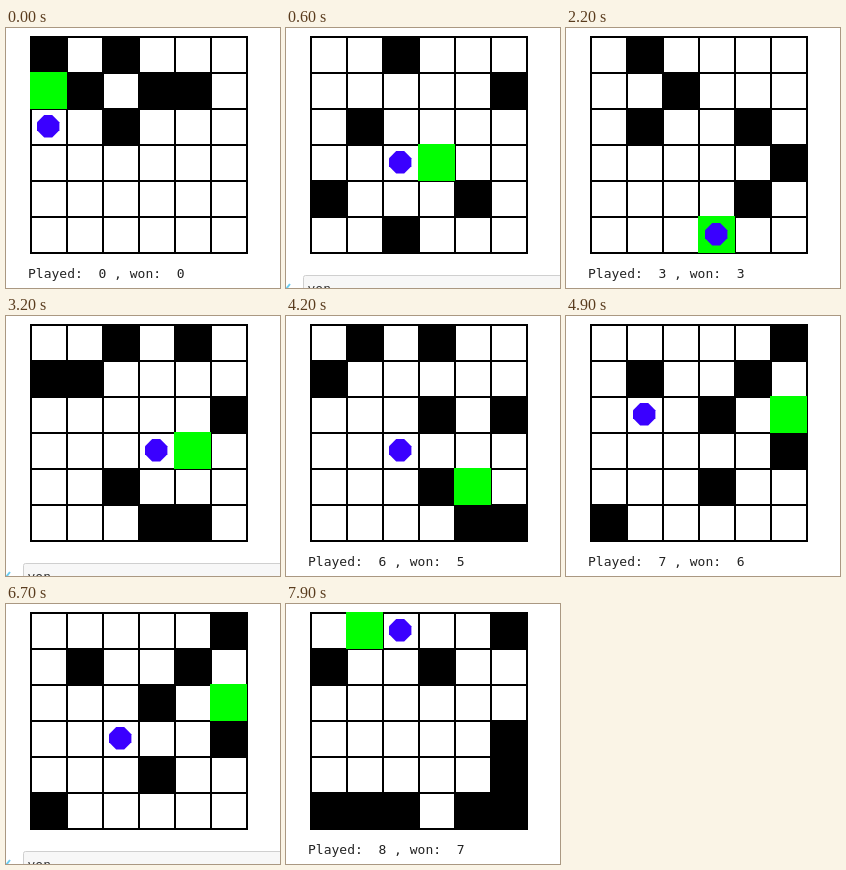
Recreate the animation shown at these times as an HTML page. Size 274 px wide and 260 px high, loop 8000 ms.

```html
<!DOCTYPE html>
<html lang="en">
<head>
<meta charset="utf-8">
<title>Grid world agent</title>
<style>
  html, body { margin: 0; width: 100%; height: 100%; overflow: hidden; background: #fff; }
  svg { display: block; }
  text { font: 13px "DejaVu Sans Mono", monospace; white-space: pre; }
</style>
</head>
<body>
<svg width="274" height="260" viewBox="0 0 274 260">
  <path id="lines" stroke="#000" stroke-width="2" stroke-linecap="square"/>
  <path id="walls" fill="#000"/>
  <path id="goal" fill="#0f0"/>
  <path id="agent" fill="#3a00ff"/>
  <text id="score" x="22" y="250" fill="#222"></text>
  <g id="nextCell">
    <rect x="17.5" y="247.5" width="270" height="30" rx="2" fill="#f7f7f7" stroke="#cfcfcf"/>
    <text x="21.5" y="265" fill="#333">von</text>
    <path d="M0 261L4 256" stroke="#6ccdf0" stroke-width="2"/>
  </g>
</svg>
<script>
const LOOP = 8000, N = 6, CELL = 36, LEFT = 25, TOP = 9;
const el = id => document.getElementById(id);

// A step is [time, row+column, time until which the score line stays hidden].
const step = (time, cell, hidden = time + 100) => ({ time, cell, hidden });
const direct = (time, cell) => step(time, cell, time);

const games = [
  { map: '#.#... G#.##. ..#... ...... ...... ......', won: 1,
    steps: [direct(0, '20'), step(200, '10')] },
  { map: '..#... .....# .#.... ...G.. #...#. ..#...', won: 1,
    steps: [step(400, '22'), step(600, '32'), step(900, '33')] },
  { map: '.#.... ..#... .#..#. .....# ....#. ...G..', won: 1,
    steps: [step(1100, '20'), step(1300, '30'), step(1500, '31'),
            step(1700, '33'), step(1900, '43'), step(2100, '53')] },
  { map: '...#.. #...#. .#.... ....#. ...G.. .#...#', won: 1,
    steps: [step(2300, '22'), step(2500, '32'), step(2700, '33'), step(2900, '43', 3100)] },
  { map: '..#.#. ##.... .....# ....G. ..#... ...##.', won: 1,
    steps: [step(3200, '33'), step(3400, '34')] },
  { map: '.#..#. ...... #..#.. ..#... .....# .G.#..', won: 0,
    steps: [step(3600, '22'), step(3900, '32')] },
  { map: '.#.#.. #..... ...#.# ...... ...#G. ....##', won: 1,
    steps: [step(4100, '32'), step(4300, '33'), direct(4500, '34'), direct(4700, '44')] },
  { map: '.....# .#..#. ...#.G .....# ...#.. #.....', won: 1,
    steps: [direct(4900, '21'), step(5100, '31'), step(5300, '21'), step(5500, '31'),
            step(5700, '21'), step(5900, '31'), direct(6200, '21'), step(6300, '22', 6500),
            step(6700, '32'), direct(7200, '34'), direct(7500, '25')] },
  { map: '.G...# #..#.. ...... .....# .....# ###.##', won: 0,
    steps: [direct(7900, '02')], open: true }
];

// Flatten the games into scenes that already know their score.
const scenes = [];
let played = 0, won = 0;
for (const game of games) {
  game.steps.forEach((s, i) => {
    if (!game.open && i === game.steps.length - 1) {
      played++;
      won += game.won;
    }
    scenes.push({ ...s, map: game.map, score: `Played:  ${played} , won:  ${won}` });
  });
}

function cellsOf(map, mark) {
  const size = CELL + 1;
  return map.split(' ').flatMap((line, r) => [...line].map((ch, c) => ch === mark
    ? `M${LEFT + c * CELL - 1} ${TOP + r * CELL - 1}h${size}v${size}h${-size}z` : '')).join('');
}

// A disc with four straight cut corners, just up and left of the cell centre.
function disc([row, col]) {
  const x = LEFT + (+col + .5) * CELL - .8, y = TOP + (+row + .5) * CELL - .8;
  const flat = 4, cut = 7.2, reach = flat + cut;
  return `M${x - flat} ${y - reach}h${2 * flat}l${cut} ${cut}v${2 * flat}l${-cut} ${cut}`
    + `h${-2 * flat}l${-cut} ${-cut}v${-2 * flat}z`;
}

let grid = '';
for (let i = 0; i <= N; i++) {
  grid += `M${LEFT} ${TOP + i * CELL}h${N * CELL}M${LEFT + i * CELL} ${TOP}v${N * CELL}`;
}
el('lines').setAttribute('d', grid);

function render(time) {
  const scene = scenes.findLast(s => s.time <= time);
  const hidden = time < scene.hidden;
  el('walls').setAttribute('d', cellsOf(scene.map, '#'));
  el('goal').setAttribute('d', cellsOf(scene.map, 'G'));
  el('agent').setAttribute('d', disc(scene.cell));
  el('score').textContent = hidden ? '' : scene.score;
  el('nextCell').style.display = hidden ? '' : 'none';
}

const start = performance.now();
function tick() {
  render((performance.now() - start) % LOOP);
  requestAnimationFrame(tick);
}
tick();
</script>
</body>
</html>
```
